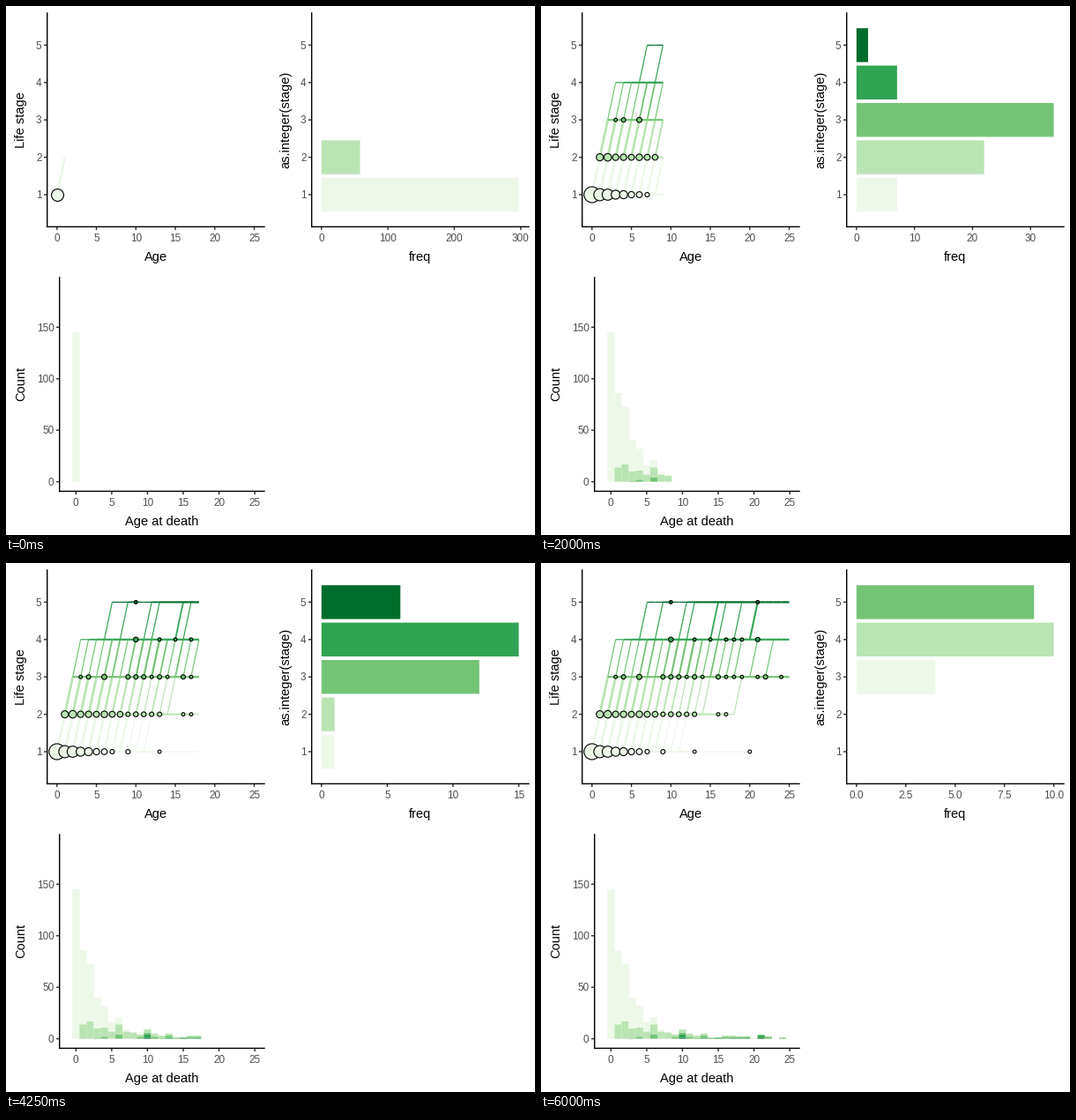
Recreate the animation shown at these times as a matplotlib script. Size 600 by 600 pixels, loop 6.25 s.

```python
import numpy as np
import matplotlib.pyplot as plt
from matplotlib.animation import FuncAnimation
from matplotlib.collections import LineCollection
from matplotlib.patches import Rectangle

plt.rcParams["font.family"] = "Liberation Sans"
plt.rcParams["path.snap"] = False

PX = 0.75  # points per pixel at 96 dpi
AGES, STAGES, COHORT = 25, 5, 500
GREENS = ["#EDF8E9", "#BAE4B3", "#74C476", "#31A354", "#006D2C"]

# One row per age; columns are life stages.
DEATHS = [(145,), (72, 14), (56, 17), (30, 9, 1), (21, 9, 2), (9, 7),
          (7, 10, 4), (2, 7), (0, 6), (2, 2, 2), (0, 3, 2, 3, 1),
          (0, 3, 2), (0, 2, 1), (1, 2, 2, 1), (0, 0, 1), (0, 0, 0, 1),
          (0, 1, 2), (0, 1, 1, 1), (0, 0, 1, 1), (0, 0, 1, 1), (1,),
          (0, 0, 1, 2, 1), (0, 0, 2), (), (0, 0, 1)]
# Individuals moving up one stage at each age.
MOVES = [(58,), (35, 8), (20, 8, 1), (14, 8, 1), (8, 7, 1), (6, 7, 1),
         (4, 5, 2, 1), (3, 4, 2), (3, 3, 1, 1), (1, 3, 2), (1, 2, 3),
         (1, 1, 3, 1), (0, 2, 4, 1), (0, 1, 2), (0, 1, 1), (0, 0, 2, 2),
         (0, 0, 1, 1), (0, 0, 1), (0, 1, 1, 1), (), (0, 0, 1, 3), (),
         (0, 0, 1), (), ()]


def table(rows):
    return np.array([list(r) + [0] * (STAGES - len(r)) for r in rows])


dead, up = table(DEATHS), table(MOVES)
alive = np.zeros((AGES + 1, STAGES), int)
alive[0, 0] = COHORT
for a in range(AGES):
    alive[a + 1] = alive[a] - dead[a] - up[a] + np.roll(up[a], 1)
stay = alive[:-1] - dead - up


def age_x(a):
    return 57.8 + 8.95 * a


def stage_y(s):
    return 256.4 - 42.4 * s


def death_x(a):
    return 79.3 + 8.115 * a


def count_y(n):
    return 539.6 - 1.1685 * n


def nice_breaks(top):
    """Extended Wilkinson breaks from zero over the padded range."""
    lo, hi = -0.05 * top, 1.05 * top
    best, out = -9, None
    for rank, q in enumerate((1, 5, 2, 2.5, 4, 3)):
        for power in range(-1, 3):
            step = q * 10.0 ** power
            for k in range(2, 12):
                end = step * (k - 1)
                cover = 1 - 0.5 * ((hi - end) ** 2 + lo ** 2) / (0.1 * (hi - lo)) ** 2
                r, ideal = 1 / step, 4 / (max(hi, end) - lo)
                density = 2 - max(r / ideal, ideal / r)
                score = 0.25 * (1 - rank / 5) + 0.2 * cover + 0.5 * density + 0.05
                if score > best:
                    best, out = score, step * np.arange(k)
    return out[out <= hi]


fig = plt.figure(figsize=(6.25, 6.25), dpi=96, facecolor="white")
ax = fig.add_axes([0, 0, 1, 1])


def line(xs, ys, color, z=3):
    ax.plot(xs, ys, color=color, lw=1.42 * PX, solid_capstyle="butt", zorder=z)


def label(x, y, s, size=8.8, color="#4D4D4D", **kw):
    ax.text(x, y, s, size=size, color=color, va="baseline", **kw)


def rect(x0, y0, x1, y1, color):
    ax.add_patch(Rectangle((x0, y0), x1 - x0, y1 - y0, fc=color, lw=0))


def panel(left, top, xticks, yticks, xname, yname):
    """Axes with ticks; tick lists hold (pixel, text) pairs."""
    right, bottom = left - left % 300 + 293.1, top + 243.1
    for x, s in xticks:
        line([x, x], [bottom, bottom + 3.67], "#333333")
        label(x, bottom + 16.6, s, ha="center")
    for y, s in yticks:
        line([left - 3.67, left], [y, y], "#333333")
        label(left - 6.2, y + 4.2, s, ha="right")
    line([left, left], [top, bottom + 0.7], "black", 4)
    line([left - 0.7, right + 0.6], [bottom, bottom], "black", 4)
    label((left + right) / 2, bottom + 38.6, xname, 11, "black", ha="center")
    label(left - left % 300 + 21, (top + bottom) / 2, yname, 11, "black",
          ha="center", rotation=90, rotation_mode="anchor")


def width(n, cap):
    return min(cap, 1.2 + 0.8 * np.log(n)) * PX


def draw_paths(last):
    segs, cols, lws = [], [], []
    for s in range(STAGES):
        for a in range(last + 1):
            for n, rise, cap in ((stay[a, s], 0, 2.2), (up[a, s], 1, 2.8)):
                if n > 0:
                    segs.append([(age_x(a), stage_y(s + 1)),
                                 (age_x(a + 1), stage_y(s + 1 + rise))])
                    cols.append(GREENS[s])
                    lws.append(width(n, cap))
    ax.add_collection(LineCollection(segs, colors=cols, linewidths=lws,
                                     capstyle="butt", zorder=5))


def draw_points(last):
    a, s = np.nonzero(dead[:last + 1])
    n = dead[a, s]
    span = n.max() - n.min()
    rel = (n - n.min()) / span if span else np.full(len(n), 0.5)
    size = 1 + 5 * np.sqrt(rel)
    radius = (size * 2.845 + 0.945) / 2
    ax.scatter(age_x(a), stage_y(s + 1), s=(2 * radius * PX) ** 2,
               c=[GREENS[i] for i in s], edgecolors="black",
               linewidths=1.1 * PX, zorder=6)


def draw_freq(counts):
    top = counts.max()
    scale = 223.8 / top
    for rank, s in enumerate(np.flatnonzero(counts)):
        y = stage_y(s + 1)
        rect(357.8, y - 19.2, 357.8 + counts[s] * scale, y + 19.2, GREENS[rank])
    ticks = nice_breaks(top)
    digits = 0 if np.allclose(ticks, np.round(ticks)) else 1
    return [(357.8 + t * scale, f"{t:.{digits}f}") for t in ticks]


def draw_deaths(last):
    for a in range(last + 1):
        base = 0
        for s in reversed(range(STAGES)):
            n = dead[a, s]
            if n:
                rect(death_x(a - 0.5), count_y(base), death_x(a + 0.5),
                     count_y(base + n), GREENS[s])
            base += n


def draw(i):
    ax.clear()
    ax.set(xlim=(0, 600), ylim=(600, 0))
    ax.axis("off")
    stages = [(stage_y(s), str(s)) for s in range(1, 6)]
    fives = range(0, 26, 5)
    panel(46.7, 7.3, [(age_x(t), str(t)) for t in fives], stages,
          "Age", "Life stage")
    draw_paths(i)
    draw_points(i)
    panel(346.7, 7.3, draw_freq(alive[i + 1]), stages,
          "freq", "as.integer(stage)")
    panel(60.7, 307.3, [(death_x(t), str(t)) for t in fives],
          [(count_y(n), str(n)) for n in range(0, 151, 50)],
          "Age at death", "Count")
    draw_deaths(i)
    return []


anim = FuncAnimation(fig, draw, frames=AGES, interval=250, repeat=True,
                     repeat_delay=0, init_func=lambda: [])
plt.show()
```
